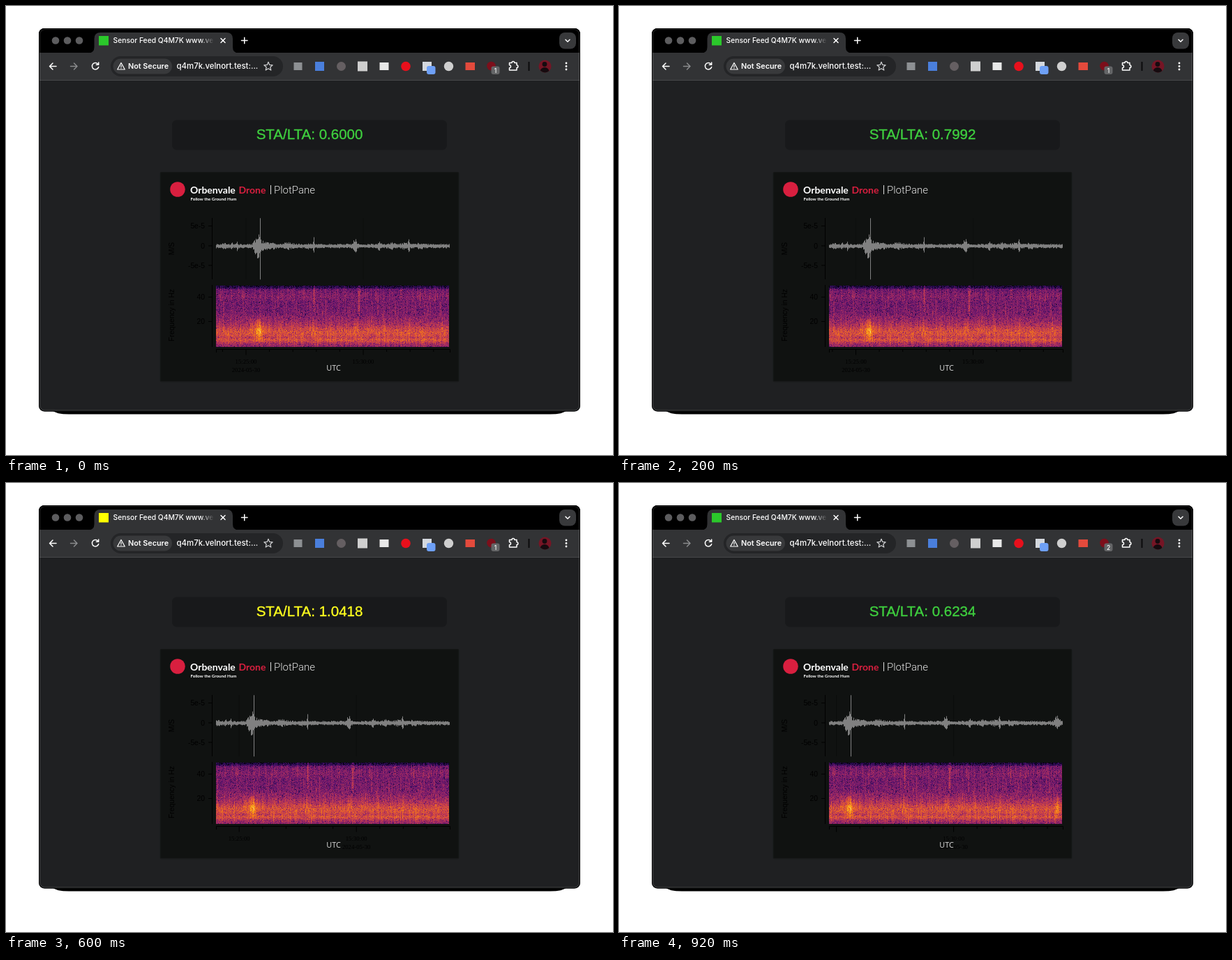
An HTML page with a canvas that plays this animation: 870 by 644 pixels, repeating every 1000 ms.

```html
<!DOCTYPE html>
<html lang="en">
<head>
<meta charset="utf-8">
<title>Seismic monitor</title>
<style>
  html, body { margin: 0; width: 100%; height: 100%; overflow: hidden; background: #fff; }
  svg, canvas { position: absolute; display: block; }
  svg { left: 0; top: 0; }
  canvas { left: 301px; top: 300px; }
  .ui { font-family: Inter, Roboto, sans-serif; font-weight: 500; fill: #fff; }
  .axis { font: 10.3px "Liberation Sans", Arial, sans-serif; fill: #000; }
  .time { font: 8.7px "Liberation Serif", Times, serif; fill: #000; text-anchor: middle; }
  .line { fill: none; stroke: #fff; stroke-width: 1.5; stroke-linecap: round; stroke-linejoin: round; }
  .dark { fill: none; stroke: #000; }
</style>
</head>
<body>
<svg width="870" height="644" viewBox="0 0 870 644">
  <defs>
    <clipPath id="win"><rect x="47" y="32" width="776" height="549.5" rx="8"/></clipPath>
    <clipPath id="title"><rect x="150" y="41" width="148" height="20"/></clipPath>
    <clipPath id="face"><circle cx="772.5" cy="86.5" r="9"/></clipPath>
    <linearGradient id="fade" gradientUnits="userSpaceOnUse" x1="279" x2="298" y1="0" y2="0">
      <stop stop-color="#323335" stop-opacity="0"/><stop offset="1" stop-color="#323335"/>
    </linearGradient>
  </defs>

  <path d="M66 580H804Q798 585.500 780 585.500H90Q72 585.500 66 580Z"/>
  <g clip-path="url(#win)">
    <rect x="47" y="32" width="776" height="550" fill="#1f2022"/>
    <rect x="47" y="32" width="776" height="36"/>
    <rect x="47" y="67" width="776" height="40" fill="#323335"/>
    <path d="M47 106.500H823" stroke="#47484a"/>
  </g>
  <rect class="dark" x="47.500" y="32.500" width="775" height="548.500" rx="8"/>
  <rect x="48.500" y="33.500" width="773" height="546.500" rx="7" fill="none" stroke="#fff" stroke-opacity=".15"/>

  <!-- tab strip -->
  <g fill="#5d5d5f">
    <circle cx="71" cy="49.500" r="5.300"/><circle cx="88" cy="49.500" r="5.300"/><circle cx="105" cy="49.500" r="5.300"/>
  </g>
  <path d="M118 67.500Q126.500 67.500 126.500 59V47Q126.500 38 135.500 38H316Q325 38 325 47V59Q325 67.500 333.500 67.500Z" fill="#323335"/>
  <rect id="icon" x="133" y="43" width="14" height="13.500"/>
  <text class="ui" x="153.500" y="53.300" font-size="10.300" clip-path="url(#title)">Sensor Feed Q4M7K www.veln</text>
  <rect x="279" y="41" width="20" height="20" fill="url(#fade)"/>
  <path class="line" d="M308 46.500l6 6m0-6l-6 6M337.500 49.500h8.500m-4.250-4.250v8.500"/>
  <rect x="793" y="38" width="24" height="23.500" rx="8" fill="#38393b"/>
  <path class="line" d="M802 48.300l3 3 3-3"/>

  <!-- toolbar -->
  <path class="line" d="M72 86.500H62.500m4.500-4.500l-4.500 4.500 4.500 4.500"/>
  <path class="line" d="M92.500 86.500H102m-4.500-4.500l4.500 4.500-4.500 4.500" style="stroke:#8a8b8d"/>
  <path class="line" d="M132 83.500A4.700 4.700 0 1 0 132.700 87.500M132.700 81v3.300h-3.300"/>
  <rect x="150" y="72" width="247" height="29" rx="14.500" fill="#242527"/>
  <rect x="153.500" y="75.500" width="84.500" height="22" rx="11" fill="#38393b"/>
  <path class="line" d="M165 81.500l5.300 9.500h-10.600zM165 85v2.600m0 1.500v.1" style="stroke-width:1.2"/>
  <text class="ui" x="175" y="90.200" font-size="10.800" style="font-weight:600">Not Secure</text>
  <text class="ui" x="244.500" y="90.200" font-size="11.400">q4m7k.velnort.test:...</text>
  <path id="star" class="line" style="stroke:#d0d1d3;stroke-width:1.2"/>

  <rect x="412.500" y="81" width="12" height="11" fill="#8d9093"/>
  <rect x="443" y="80" width="13" height="13" fill="#4a7fdc"/>
  <circle cx="480.500" cy="86.500" r="6.500" fill="#655f62"/>
  <rect x="504" y="79.500" width="14" height="14" fill="#cfcfcf"/>
  <rect x="535.500" y="81" width="13" height="11" fill="#e8e8e8"/>
  <circle cx="573" cy="86.500" r="6.800" fill="#e8101c"/>
  <rect x="597" y="80" width="13" height="13" fill="#d4d8de"/>
  <rect x="603" y="86" width="12.500" height="12" rx="3" fill="#6ea0f6"/>
  <circle cx="634.500" cy="86.500" r="6.700" fill="#cfcfcf"/>
  <rect x="658.500" y="81" width="13.500" height="11" fill="#e34a3c"/>
  <circle cx="695.500" cy="86" r="6.300" fill="#7c0f1b"/>
  <rect x="695.500" y="86.500" width="12" height="11.500" rx="3" fill="#646567"/>
  <text id="badge" class="ui" x="701.500" y="95.500" font-size="8.500" text-anchor="middle"></text>
  <path class="line" d="M721.500 81.500h3.500a1.900 1.900 0 0 1 3.800 0h3.200v3.300a1.900 1.900 0 0 1 0 3.800v3.400h-10.500v-3.200a2 2 0 0 0 0-4z"/>
  <path d="M749.500 80v13" stroke="#0b0b0c" stroke-width="2"/>
  <g clip-path="url(#face)">
    <rect x="763" y="77" width="20" height="20" fill="#761525"/>
    <circle cx="772" cy="83.500" r="3.400" fill="#160b0f"/>
    <ellipse cx="772" cy="94" rx="6.500" ry="6" fill="#160b0f"/>
  </g>
  <g fill="#fff"><circle cx="803" cy="82" r="1.400"/><circle cx="803" cy="86.500" r="1.400"/><circle cx="803" cy="91" r="1.400"/></g>

  <!-- ratio box -->
  <rect x="238" y="163.500" width="394" height="43" rx="7" fill="#18191b"/>
  <text id="ratio" x="435" y="190.500" text-anchor="middle" font-size="20.500" stroke-width=".35" font-family="'Liberation Sans', Arial, sans-serif"></text>

  <!-- plot panel -->
  <rect x="220.500" y="238" width="429" height="301.500" rx="2" fill="#191a1b"/>
  <rect x="221.500" y="238.500" width="427" height="299.500" fill="#101211"/>
  <circle cx="246" cy="263" r="10.800" fill="#d81f3f"/>
  <g font-family="Lato, sans-serif" font-weight="700" font-size="14" fill="#fff">
    <text x="264" y="269">Orbenvale</text>
    <text x="333.500" y="269" fill="#d81f3f">Drone</text>
    <text x="264.500" y="278.500" font-size="6.200">Follow the Ground Hum</text>
  </g>
  <path d="M379.500 257v13" stroke="#ddd"/>
  <text x="384" y="268.500" font-family="Roboto, sans-serif" font-weight="300" font-size="15" fill="#e4e4e4">PlotPane</text>

  <path class="dark" d="M295.500 304V392M290 315.500h5.500M290 344h5.500M290 372h5.500M295.500 400V489M290 417.500h5.500M290 452.500h5.500"/>
  <g class="axis" text-anchor="end">
    <text x="285" y="319">5e-5</text><text x="285" y="347.500">0</text><text x="285" y="375.500">-5e-5</text>
    <text x="285" y="421">40</text><text x="285" y="456">20</text>
  </g>
  <g class="axis" text-anchor="middle">
    <text transform="translate(241 348) rotate(-90)">M/S</text>
    <text transform="translate(241 443.500) rotate(-90)">Frequency in Hz</text>
  </g>
  <path id="grid" fill="none" stroke="#0c0e0d"/>
  <path id="ticks" class="dark"/>
  <text id="timeA" class="time" y="512.500">15:25:00</text>
  <text id="timeB" class="time" y="512.500">15:30:00</text>
  <text id="date" class="time" y="525">2024-05-30</text>
  <text x="469.500" y="523" text-anchor="middle" font-family="'Open Sans', 'Noto Sans', sans-serif" font-size="10.800" fill="#dcdcdc">UTC</text>
</svg>
<canvas id="plot" width="337" height="190"></canvas>

<script>
const $ = id => document.getElementById(id);
const LEFT = 301, MIDDLE = 44, SPEC_TOP = 101, SPEC_W = 334, SPEC_H = 88;
const GREEN = '#3fd03f', YELLOW = '#ffff1e';
const STEP = 200;
const states = [
  { ratio: '0.6000', color: GREEN, icon: '#2bc82b', badge: 1, shift: 0 },
  { ratio: '0.7992', color: GREEN, icon: '#2bc82b', badge: 1, shift: 4.5 },
  { ratio: '0.7942', color: GREEN, icon: '#ffff00', badge: 1, shift: 7.5 },
  { ratio: '1.0418', color: YELLOW, icon: '#ffff00', badge: 1, shift: 9.8 },
  { ratio: '0.6234', color: GREEN, icon: '#2bc82b', badge: 2, shift: 32.4 }
];

// centre, width, height of each tremor
const tremors = [
  [313, 3, 1.5], [323, 1, 4], [331, .8, 9], [356, 2, 6], [361, 3, 15], [368, 4, 4],
  [379, 8, 2], [404, 9, 2], [435, 5, 1.5], [441, .9, 9], [500, 3, 7], [535, 3, 3],
  [553, 5, 2], [572, 6, 2], [577, 1, 7], [593, 4, 2], [660, 3.5, 8]
];
// centre, width, gain, upper edge, lower edge of each bright streak
const streaks = [
  [441, 1.1, .19, 0, 37], [505, 1.8, .1, 0, 36], [593, .8, .12, 0, 30], [533, .8, .09, 0, 40],
  [362, 4.5, .17, 42, 82], [364, 1, .07, 40, 85], [359, 9, .05, 46, 80], [500, 3, .07, 45, 75],
  [577, 2, .06, 45, 75], [441, 4, .05, 45, 75], [660, 3, .16, 44, 80]
];
// row, level of the mean spectrum
const profile = [[0, .08], [3, .16], [5, .3], [14, .35], [26, .32], [40, .34], [50, .4], [57, .47],
  [62, .54], [66, .58], [71, .56], [74, .51], [77, .58], [79, .56], [82, .46], [86, .39], [88, .32]];
const heat = [[0, 0, 4], [40, 11, 84], [101, 21, 110], [159, 42, 99], [212, 72, 66], [245, 125, 21], [250, 193, 39], [252, 255, 164]];

const bell = (x, c, w) => Math.exp(-(((x - c) / w) ** 2));
const mix = (a, b, t) => a + (b - a) * t;

function rand(x, y) {
  let h = Math.imul(x + 101, 374761393) ^ Math.imul(y + 57, 668265263);
  h = Math.imul(h ^ h >>> 13, 1274126177);
  h = Math.imul(h ^ h >>> 16, 2246822519);
  return ((h ^ h >>> 15) >>> 0) / 4294967296;
}

function level(row) {
  const i = Math.max(1, profile.findIndex(p => p[0] >= row));
  const [a, b] = [profile[i - 1], profile[i]];
  return mix(a[1], b[1], (row - a[0]) / (b[0] - a[0]));
}

function heatColor(v) {
  const p = Math.min(.999, Math.max(0, v)) * (heat.length - 1), i = Math.floor(p);
  return heat[i].map((c, k) => mix(c, heat[i + 1][k], p - i));
}

const ctx = $('plot').getContext('2d');
const levels = Array.from({ length: SPEC_H }, (_, row) => level(row));

function drawWave(shift) {
  ctx.fillStyle = '#808080';
  for (let col = 0; col < 335; col++) {
    const x = LEFT + col + shift;
    const size = tremors.reduce((sum, [c, w, h]) => sum + h * bell(x, c, w), 2.8);
    let up = size * (.5 + .7 * rand(x, 900)), down = size * (.5 + .7 * rand(x, 901));
    if (x === 364) { up = 40; down = 48; }
    ctx.fillRect(col, MIDDLE + .3 - up, 1, up + down);
  }
}

// Each column gets its own faint streaks, one per frequency band.
const flicker = (x, band) => .1 * rand(x, 700 + band) ** 3 - .025;

function drawSpectrum(shift) {
  const img = ctx.createImageData(SPEC_W, SPEC_H);
  for (let col = 0; col < SPEC_W; col++) {
    const x = LEFT + col + shift;
    const near = streaks.filter(s => Math.abs(x - s[0]) < 3 * s[1]);
    for (let row = 0; row < SPEC_H; row++) {
      const grain = Math.log(-Math.log(1 - rand(x, row) * .998 - .001)) + .58;
      let v = levels[row] + flicker(x, Math.floor(row / 22)) + Math.max(-.24, grain * .055);
      for (const [c, w, gain, a, b] of near)
        if (row >= a && row <= b) v += gain * bell(x, c, w) * (a ? Math.sin(Math.PI * (row - a) / (b - a)) : 1);
      img.data.set([...heatColor(v), 255], 4 * (row * SPEC_W + col));
    }
  }
  ctx.putImageData(img, 0, SPEC_TOP);
}

function drawAxis(shift, dateOnFirst) {
  const first = 344 - shift, second = first + 168;
  let d = 'M301.5 497V492.5H636.5V497';
  for (let k = -1; k < 10; k++) {
    const x = first + k * 33.6;
    if (x > LEFT && x < 636) d += `M${x} 492.5v${k % 5 ? 3.5 : 8}`;
  }
  $('ticks').setAttribute('d', d);
  $('grid').setAttribute('d', `M${first} 304V392M${second} 304V392`);
  $('timeA').setAttribute('x', first);
  $('timeA').style.display = first > 320 ? '' : 'none';
  $('timeB').setAttribute('x', second);
  $('date').setAttribute('x', dateOnFirst ? first : second);
}

function show(i) {
  const s = states[i], shift = Math.floor(s.shift);
  $('ratio').textContent = 'STA/LTA: ' + s.ratio;
  $('ratio').setAttribute('fill', s.color);
  $('ratio').setAttribute('stroke', s.color);
  $('icon').setAttribute('fill', s.icon);
  $('badge').textContent = s.badge;
  ctx.clearRect(0, 0, 337, 190);
  drawWave(shift);
  drawSpectrum(shift);
  drawAxis(s.shift, i < 2);
}

$('star').setAttribute('d', 'M' + Array.from({ length: 10 }, (_, k) => {
  const a = Math.PI * k / 5, r = k % 2 ? 2.9 : 6.5;
  return `${376 + r * Math.sin(a)} ${86.8 - r * Math.cos(a)}`;
}).join('L') + 'Z');

let shown = 0;
const start = performance.now();
function tick(now) {
  const i = Math.floor(Math.max(0, now - start) / STEP) % states.length;
  if (i !== shown) show(shown = i);
  requestAnimationFrame(tick);
}
show(0);
requestAnimationFrame(tick);
</script>
</body>
</html>
```
